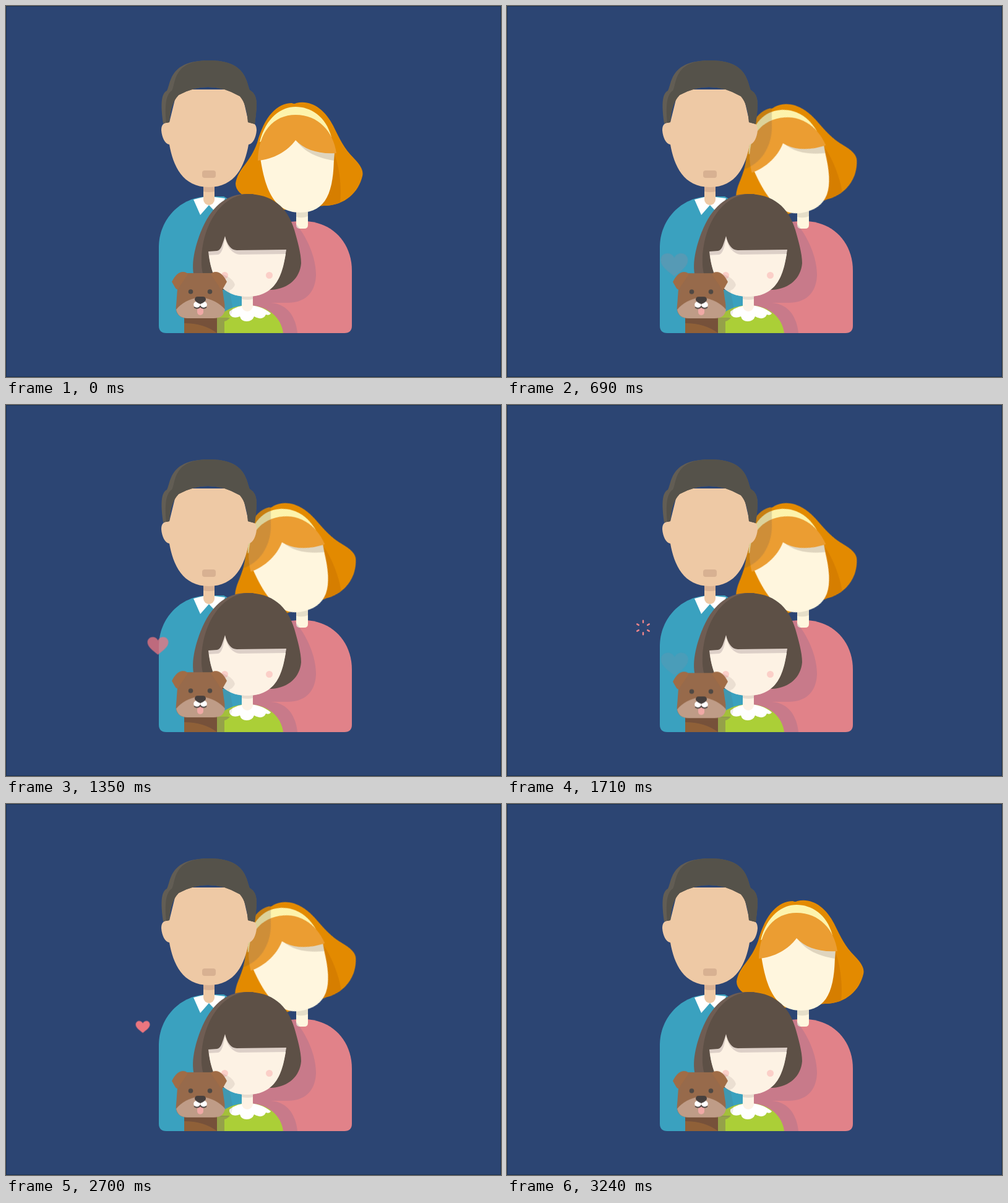
An HTML page that plays this animation: 800 by 600 pixels, repeating every 3.27 s.

```html
<!DOCTYPE html>
<html lang="en">
<head>
<meta charset="utf-8">
<title>Family portrait</title>
<style>
  html, body { margin: 0; width: 100%; height: 100%; overflow: hidden; background: #2c4573; }
  svg { display: block; width: 800px; height: 600px; }

  .tilt, .cast, .pant, .heart, .burst, .burst use {
    animation-duration: 3270ms;
    animation-iteration-count: infinite;
    animation-timing-function: linear;
  }

  .tilt { transform-origin: 476px 303px; animation-name: tilt; animation-timing-function: ease-in-out; }
  @keyframes tilt {
    0%, 99.1%, 100% { transform: rotate(0deg); }
    9.17%, 89.9% { transform: rotate(-15deg); }
  }

  .cast { animation-name: cast; }
  @keyframes cast {
    0%, 99.1%, 100% { opacity: 0; }
    9.17%, 89.9% { opacity: 1; }
  }

  .pant { animation-name: pant; animation-timing-function: ease-in-out; }
  @keyframes pant {
    0%, 12.84%, 22.02%, 31.19%, 40.37%, 49.54%, 58.72%, 67.89%, 77.06%, 86.24%, 95.41% { transform: translateY(0); }
    17.43%, 26.61%, 35.78%, 44.95%, 54.13%, 63.3%, 72.48%, 81.65%, 90.83%, 100% { transform: translateY(2px); }
  }

  .heart {
    transform-origin: 0 0;
    animation-name: fly, fade, shrink;
    animation-timing-function: cubic-bezier(.333, 0, .667, .15), linear, linear;
  }
  @keyframes fly {
    0%, 15.9%, 49.39% { translate: 271px 419px; }
    49.38%, 82.87%, 100% { translate: 220px 359px; }
  }
  @keyframes fade {
    0%, 15.9%, 49.39%, 82.88%, 100% { opacity: 0; }
    49.38%, 82.87% { opacity: 1; }
  }
  @keyframes shrink {
    0%, 34%, 49.39%, 67.5% { scale: 1; }
    49.38%, 82.87%, 100% { scale: .51; }
  }

  .burst { stroke: #f0858b; stroke-width: 2.4; stroke-linecap: round; animation-name: flash; }
  .burst use { stroke-dasharray: 3 40; animation-name: spread; animation-timing-function: ease-out; }
  @keyframes flash {
    0%, 49.38%, 54.9%, 82.87%, 88.39%, 100% { opacity: 0; }
    49.39%, 52.75%, 82.88%, 86.24% { opacity: 1; }
  }
  @keyframes spread {
    0%, 49.39%, 82.88% { stroke-dashoffset: 0; }
    49.38%, 54.9%, 82.87%, 88.39%, 100% { stroke-dashoffset: -11.5; }
  }
</style>
</head>
<body>
<svg width="800" height="600" fill="none">
  <defs>
    <path id="hair" d="M469 157C492 151 515 166 529 194C540 216 546 230 562 246C574 258 578 267 576 275C570 301 548 323 514 323L445 330C410 318 371 310 371 287C375 262 394 255 406 221C418 178 438 157 462 157Q466 159 469 157Z"/>
    <clipPath id="hairClip"><use href="#hair"/></clipPath>
    <path id="ray" d="M0 0V-15"/>
    <path id="ear" d="M268 446Q276 430 286 430Q292 430 294 434L281 453C278 461 275 459 272 453Z"/>
  </defs>

  <rect width="800" height="600" fill="#2c4573"/>
  <rect x=".5" y=".5" width="799" height="599" stroke="#1a3354"/>

  <!-- mother -->
  <path fill="#e18289" d="M390 529V400L440 352Q460 348 480 348C526 348 559 382 559 428V517Q559 529 547 529Z"/>
  <path fill="#fff6de" d="M469 325H488V354Q488 360 482 360H475Q469 360 469 354Z"/>
  <path fill="#e6dfc9" d="M469 325H488V340Q479 344 469 341Z"/>
  <path fill="#645a8c" fill-opacity=".2" d="M466 349C488 375 501 408 501 435C500 465 482 480 455 480H428C455 482 468 502 471 529H390V400L440 352Z"/>
  <g class="tilt">
    <use href="#hair" fill="#e38a00"/>
    <path fill="#d67e00" d="M530 238C541 265 542 300 540 318Q527 323 514 323L503 322Z"/>
    <path fill="#fff6de" d="M411 246C418 290 430 334 475 334C518 334 530 300 530 240L468 212Z"/>
    <path fill="#dfd5bf" d="M468 216C480 230 505 238 531 237L530 250C505 246 482 237 468 216Z"/>
    <path fill="#fdf3ac" d="M410 220C420 180 445 163 468 163C492 163 517 178 526 212L468 200Z"/>
    <path fill="#eb9d32" d="M407 250C408 204 432 176 468 176C505 176 529 203 534 238C505 240 482 232 468 217C455 235 432 248 407 250Z"/>
    <g clip-path="url(#hairClip)">
      <path class="cast" transform="rotate(15 476 303)" fill="#5a5050" fill-opacity=".2" d="M370 140H428V200C426 230 410 255 383 264H360Z"/>
    </g>
  </g>

  <!-- father -->
  <path fill="#3aa1bf" d="M247 517V390C247 346 281 308 328 308H352L390 330V529H259Q247 529 247 517Z"/>
  <path fill="#fff" d="M303 313L319 309L328 322L337 309L354 311L343 338L328 322L314 338Z"/>
  <path fill="#eec9a5" d="M319 285H337V313A9 9 0 0 1 319 313Z"/>
  <path fill="#d9b294" d="M319 285H337V300Q328 302 319 300Z"/>
  <path fill="#eec9a5" d="M264 188C254 188 251 193 251 201C252 213 257 223 264 224C270 258 285 293 328 293C371 293 386 258 392 224C399 223 404 213 405 201C405 193 402 188 392 188L380 135H277Z"/>
  <path fill="#625d54" d="M254 190C250 162 250 142 260 137C267 126 262 88 328 88C388 88 388 122 394 136C406 143 406 156 404 175L402 191L391 188C390 170 386 155 378 146Q328 117 279 144C268 155 265 172 264 188Z"/>
  <path fill="#55524a" d="M259 189C256 160 259 142 268 137C275 126 268 88 328 88C388 88 388 122 394 136C406 143 406 156 404 175L402 191L391 188C390 170 386 155 378 146Q328 117 279 144C268 155 265 172 264 188Z"/>
  <rect x="317" y="266" width="22" height="12" rx="4" fill="#d8b192"/>

  <!-- daughter -->
  <path fill="#abcf37" d="M341 529V504C352 492 370 484 390 484C425 484 445 505 448 529Z"/>
  <path fill="#fff" d="M361 494Q374 484 390 484Q412 484 428 497Q426 501 420 499Q417 506 409 505Q404 504 401 502Q398 510 389 510Q380 510 378 502Q372 505 366 503Q360 500 361 494Z"/>
  <path fill="#6f5d53" d="M389 304C342 304 320 345 308 385C301 410 301 425 304 438C310 452 325 458 345 459H400V304Z"/>
  <path fill="#5d5046" d="M389 304C346 308 318 355 316 408C315 430 320 446 332 457L345 459H430C457 457 475 440 477 416C477 400 471 380 466 362C455 325 430 304 389 304Z"/>
  <path fill="#fdf2e4" d="M381 462H399V485A9 9 0 0 1 381 485Z"/>
  <path fill="#e8dccf" d="M381 462H399V474Q390 476 381 474Z"/>
  <path fill="#ddd0c8" d="M327 397L341 396C348 395 350 384 354 372C357 386 364 395 373 395L453 394C448 425 440 470 390 470C340 470 330 425 327 397Z"/>
  <path fill="#fdf2e4" d="M328 403L343 402C350 400 352 386 354 374C357 390 366 401 378 402L452 401C447 432 438 470 390 470C342 470 332 432 328 403Z"/>
  <g fill="#fbcfc8">
    <circle cx="353.5" cy="435.5" r="5.5"/>
    <circle cx="425.5" cy="435.5" r="5.5"/>
  </g>

  <!-- heart and its pop -->
  <path class="heart" fill="#ee7780" d="M0 19C-10 11 -22 3 -22 -7C-22 -20 -5 -22 0 -11C5 -22 22 -20 22 -7C22 3 10 11 0 19Z"/>
  <g transform="translate(220 360)">
    <g class="burst">
      <use href="#ray"/>
      <use href="#ray" transform="rotate(60)"/>
      <use href="#ray" transform="rotate(120)"/>
      <use href="#ray" transform="rotate(180)"/>
      <use href="#ray" transform="rotate(240)"/>
      <use href="#ray" transform="rotate(300)"/>
    </g>
  </g>

  <!-- dog -->
  <path fill="#6e4b6e" fill-opacity=".35" d="M341 504H362Q358 509 353 510V529H341Z"/>
  <path fill="#8f6038" d="M288 500H341V529H288Z"/>
  <path fill="#76513a" d="M288 500H341V529Q320 513 288 513Z"/>
  <g class="pant">
    <path fill="#6e5a50" fill-opacity=".12" d="M350 434Q367 440 370 451Q367 458 361 460L366 485Q367 499 358 504H345Z"/>
    <path fill="#976a4b" d="M284 432H343C349 445 350 460 353 480C356 498 345 505 335 505H294C281 505 273 498 275 484C277 465 276 446 284 432Z"/>
    <g fill="#a06c46">
      <use href="#ear"/>
      <use href="#ear" transform="matrix(-1 0 0 1 625 0)"/>
    </g>
    <path fill="#bf9c87" d="M275 491C284 480 295 474 314 471C333 474 345 480 354 491C352 502 345 505 335 505H294C283 505 277 500 275 491Z"/>
    <g fill="#4f4843">
      <circle cx="298.5" cy="462" r="3.8"/>
      <circle cx="329.5" cy="462" r="3.8"/>
    </g>
    <path fill="#f0a9a6" d="M309 488H319V495A5 5 0 0 1 309 495Z"/>
    <g fill="#fff">
      <circle cx="308.5" cy="483" r="5.3"/>
      <circle cx="319.5" cy="483" r="5.3"/>
    </g>
    <path stroke="#463f3d" stroke-width="2" d="M304 487Q310 491 314 486Q318 491 324 487"/>
    <path fill="#463f3d" d="M310 470H318Q323 470 323 475Q322 479 314 482Q306 479 305 475Q305 470 310 470Z"/>
  </g>
</svg>
</body>
</html>
```
